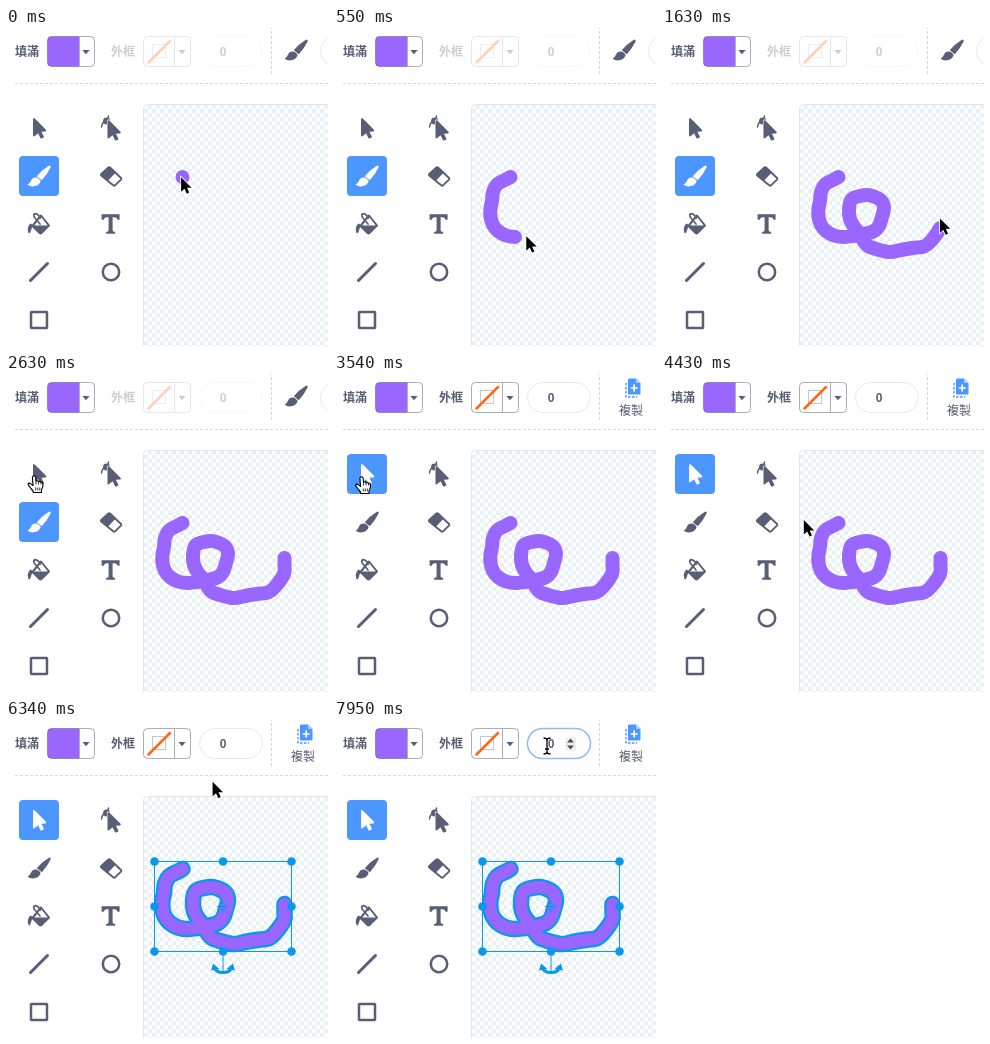
These frames come from a looping animation (322x318 px, 8000 ms). An HTML page:

```html
<!DOCTYPE html>
<html lang="zh-Hant">
<head>
<meta charset="utf-8">
<title>Paint editor</title>
<style>
  html, body { margin: 0; width: 100%; height: 100%; overflow: hidden; background: #fff; }
  svg { display: block; }
  text { font: 700 12px "Noto Sans CJK TC", "Noto Sans CJK", "Noto Sans CJK JP", sans-serif; fill: #575e75; }
  .num { font: 700 12px "Liberation Sans", Arial, sans-serif; text-anchor: middle; }
  .ink { fill: #575e75; }
  .line { fill: none; stroke: #575e75; stroke-width: 2.5; stroke-linejoin: round; stroke-linecap: round; }
  .rule { fill: none; stroke: #d9d9d9; stroke-dasharray: 3 2; }
  .edge { fill: none; stroke: #575e75; stroke-opacity: .5; }
  .pill { fill: #fff; stroke: #e8e8e8; }
  .active .ink { fill: #fff; }
  .draw { fill: none; stroke-linecap: round; stroke-linejoin: round; }
  .blue { fill: none; stroke: #0a99ea; }
  .dot { fill: #0a99ea; }
</style>
</head>
<body>
<svg width="322" height="318" viewBox="0 0 322 318">
  <defs>
    <pattern id="check" x="142" y="77" width="8" height="8" patternUnits="userSpaceOnUse">
      <rect width="8" height="8" fill="#fff"/>
      <path d="M0 0h4v8h4V4H0z" fill="#e8f0f8"/>
    </pattern>
    <path id="brush" d="M11-10.3Q12.2-9.8 11.4-8.2 8-1 2.8 4.2L-2.2.2Q3-6 9.5-10 10.4-10.6 11-10.3ZM-3 1.6Q.8 2.6 1.6 5.4 0 9.5-5 10.3-9 10.8-11.4 8.4-9.2 8-8.2 5-6.6 1.2-3 1.6Z"/>
    <path id="pointer" d="M-6-9.2Q-5.4-10.4-4.2-9.4L7 1.8Q8 3.2 6.4 3.4L2.4 3.7 4.8 8.6Q5 9.4 4.3 9.8L2.6 10.5Q1.8 10.7 1.4 10L-.9 5.2-4.2 8.1Q-5.8 9-6 7.4Z"/>
    <path id="caret" class="ink" d="M-3.6-2H3.6L0 2.2Z"/>
    <path id="ibeam" d="M-3.5-8Q0-8 0-6V6Q0 8-3.5 8M3.5-8Q0-8 0-6M3.5 8Q0 8 0 6M-2 3H2"/>
  </defs>

  <!-- top bar -->
  <text x="9" y="28">填滿</text>
  <path d="M73 8.5H45.5a4 4 0 0 0-4 4v22a4 4 0 0 0 4 4H73Z" fill="#96f"/>
  <path class="edge" d="M73.5 9V38"/>
  <rect class="edge" x="41.5" y="8.5" width="47" height="30" rx="4"/>
  <use href="#caret" x="80" y="24"/>
  <g id="outline">
    <text x="105" y="28">外框</text>
    <rect x="146.5" y="16.5" width="13" height="13" fill="none" stroke="#c4c6cc"/>
    <path d="M142.5 34.5 164 13" stroke="#ff661a" stroke-width="2.5" stroke-linecap="round"/>
    <path class="edge" d="M168.5 9V38"/>
    <rect class="edge" x="137.5" y="8.5" width="47" height="30" rx="4"/>
    <use href="#caret" x="176" y="24"/>
    <rect id="field" class="pill" x="193.5" y="8.5" width="63" height="30" rx="15"/>
    <text class="num" x="217" y="28">0</text>
  </g>
  <g id="spin">
    <rect x="231" y="17" width="11" height="14" rx="2" fill="#efefef"/>
    <path d="M233 22.5h7L236.5 18.5ZM233 25.5h7L236.5 29.5Z" fill="#4d4d4d"/>
  </g>
  <path class="rule" d="M265.5-2V46M9 55.5H322"/>
  <g id="brushBar">
    <use class="ink" href="#brush" x="290" y="22"/>
    <rect class="pill" x="314.5" y="8.5" width="63" height="30" rx="15"/>
  </g>
  <g id="copyBar">
    <path d="M292 9V23H303" fill="none" stroke="#4c97ff" stroke-width="1.4" stroke-dasharray="2.5 1.5"/>
    <path d="M295 4.5H302L306.5 9V19.5a1 1 0 0 1-1 1H295a1 1 0 0 1-1-1V5.5a1 1 0 0 1 1-1Z" fill="#4c97ff"/>
    <path d="M302 4.5V9H306.5Z" fill="#a6cbff"/>
    <path d="M300.2 10.5v7M296.7 14h7" stroke="#fff" stroke-width="1.7"/>
    <text x="285" y="41" style="font-weight:400">複製</text>
  </g>

  <!-- tools -->
  <rect id="mark" x="13" width="40" height="40" rx="4" fill="#4c97ff"/>
  <g id="selectTool"><use class="ink" href="#pointer" x="33" y="100"/></g>
  <g id="brushTool"><use class="ink" href="#brush" x="33" y="148"/></g>
  <g transform="translate(105 100)">
    <path class="line" d="M-9.5-1Q-9-6-4.5-7.5-2.5-8.5-2.5-12" style="stroke-width:1.5"/>
    <circle class="ink" cx="-4.5" cy="-7" r="3.4"/>
    <use class="ink" href="#pointer" x="2.5" y="2" stroke="#fff" stroke-width="1.2" paint-order="stroke"/>
  </g>
  <g transform="translate(105 148)">
    <path class="line" d="M-9.8-2-2.6-8.6Q-1.8-9.2-1-8.5L10 2Q10.7 2.8 10 3.6L4 9.4Q3 10 2.2 9.3L-9.8-.5Q-10.5-1.2-9.8-2Z" style="stroke-width:1.9"/>
    <path class="ink" d="M-9.8-2-2.6-8.6Q-1.8-9.2-1-8.5L4.5-3.2-3.2 4.8-9.8-.5Q-10.5-1.2-9.8-2Z"/>
  </g>
  <g transform="translate(33 196)">
    <path class="line" d="M2-8.5 10 1.5 2.5 9Q1.5 9.8.5 9L-6.5 2Z" style="stroke-width:2"/>
    <path class="ink" d="M-6.5 1.5 10 1.5 2.5 9Q1.5 9.8.5 9ZM-8-.5C-11.5 1-12 7-10 9.5-7.5 8.5-8.5 4-5.5 2Z"/>
    <path class="line" d="M1 0-4.5-6.5Q-6.5-10-3.5-10.3-1-10 1.5-6" style="stroke-width:1.7"/>
  </g>
  <path class="ink" transform="translate(-.4 -.8)" d="M96 187h18v5.5h-2Q111.5 190 109 190h-2v13q0 1.5 2.5 1.7V206.5h-9V204.7q2.5-.2 2.5-1.7V190h-2Q98.500 190 98 192.5H96Z"/>
  <path class="line" d="M24.5 252.5 41.5 235.5" style="stroke-width:3"/>
  <circle class="line" cx="105" cy="244" r="8.2"/>
  <rect class="line" x="25" y="284" width="16" height="16" rx=".5"/>

  <!-- canvas -->
  <rect x="137.5" y="76.5" width="200" height="260" rx="4" fill="url(#check)" stroke="#dfe6ee"/>
  <path id="halo" class="draw" stroke="#0a99ea" stroke-width="16.5"/>
  <path id="stroke" class="draw" stroke="#96f"/>
  <circle id="tip" r="7" fill="#96f"/>
  <g id="frame" class="blue">
    <rect x="148.5" y="141.5" width="137" height="90"/>
    <circle cx="217" cy="186.5" r="3.5"/>
    <path d="M211 186.5h12M217 180.5v12"/>
  </g>
  <g id="handles">
    <path class="blue" d="M217 231V252"/>
    <path class="blue" d="M208.5 247Q209 252.500 217 252.5 225 252.500 225.5 247" stroke-width="3"/>
    <path class="dot" d="M205 250.500 207 243.5 213.500 249ZM229 250.500 227 243.5 220.500 249Z"/>
  </g>

  <!-- cursors -->
  <g id="cursor">
    <path id="arrow" d="M.6.8V15.3L4 12.2 6.3 17.2 8.7 16.1 6.5 11.2H11Z" stroke="#fff" stroke-width="1.6" paint-order="stroke"/>
    <g id="hand" fill="#fff" stroke="#000" stroke-width="1.1" stroke-linejoin="round">
      <path d="M-1.6 1.4Q0-.8 1.6 1.4L2 5.8Q3.7 4.6 4.6 6.2 6.2 5.2 7 6.8 8.9 6.4 9 8.5 9.1 12 7.5 14.3V17H-.5Q-1 15-3 13-5.6 10-6 8.5-5 6.8-3 8.4L-1 10Z"/>
      <path d="M2 5.8V9M4.6 6.2V9M7 6.8V9M1.8 12v3M3.8 12v3M5.8 12v3" stroke-width=".8"/>
    </g>
    <g id="beam" fill="none">
      <use href="#ibeam" stroke="#fff" stroke-width="2.6"/>
      <use href="#ibeam" stroke="#000" stroke-width="1.3"/>
    </g>
  </g>
</svg>
<script>
const LOOP = 8000, STEP = 88;
const $ = id => document.getElementById(id);
const show = (id, on) => { $(id).style.display = on ? '' : 'none'; };
const mix = (a, b, k) => a + (b - a) * k;

// Centre line of the stroke; the brush covers two points on every step.
const pts = [
  [176.5, 149], [170, 152.5], [163, 156.5], [159, 164], [158, 173], [156.5, 181],
  [156.5, 189], [159, 197], [164, 203], [172, 207.5], [181, 209], [190, 208],
  [199, 206.5], [206, 205], [212, 203], [217, 198], [220, 189], [222, 180],
  [219.5, 173], [212, 168.5], [204, 167], [190, 171], [187, 182], [188, 191],
  [191.5, 198], [197, 205], [201, 212], [206, 218], [216, 221.5], [228, 224],
  [239, 222], [251, 220], [262, 218.5], [269, 213], [278, 200], [278.5, 192], [278.5, 184]
];
const STEPS = (pts.length - 1) / 2;

// Smooth curve through the points, one Bezier piece per point.
const at = i => pts[Math.max(0, Math.min(pts.length - 1, i))];
const pieces = pts.map((p, i) => {
  if (!i) return `M${p}l0 .01M${p}`;
  const a = at(i - 2), b = at(i - 1), d = at(i + 1);
  const c1 = [0, 1].map(k => b[k] + (p[k] - a[k]) / 6);
  const c2 = [0, 1].map(k => p[k] - (d[k] - b[k]) / 6);
  return `C${c1} ${c2} ${p}`;
});
$('halo').setAttribute('d', pieces.join(''));

function stepsDrawn(t) {
  if (t < 190) return 0;
  if (t >= 1990) return STEPS;
  return Math.min(STEPS - 1, Math.floor((t - 100) / 90));
}

// Cursor poses: [time, x, y, shape], each held until the next.
const poses = [[0, 174.5, 148.5, 'arrow']];
for (let i = 0; i < STEPS; i++) {
  const a = pts[2 * i], b = pts[2 * i + 2];
  poses.push([100 + i * 90, mix(a[0], b[0], .65) - 1, mix(a[1], b[1], .65), 'arrow']);
}
const smooth = k => k * k * (3 - 2 * k);
function glide(start, n, from, to) {
  for (let i = 1; i <= n; i++) {
    const k = smooth(i / n), x = mix(from[0], to[0], k), y = mix(from[1], to[1], k);
    const onTool = y > 80 && (x < 53 || (x > 85 && x < 125 && y < 120));
    poses.push([start + (i - 1) * STEP, x, y, onTool ? 'hand' : 'arrow']);
  }
}
glide(2190, 6, [277, 185], [28, 101.5]);
poses.push([2980, 28, 102, 'hand'], [3540, 27.5, 102.5, 'hand'], [3630, 27.5, 103.5, 'hand']);
glide(3990, 10, [27.5, 103.5], [203, 168]);
glide(5900, 6, [203, 168], [206, 61]);
poses.push(
  [6430, 207, 51, 'arrow'], [6520, 208, 45, 'arrow'], [6610, 209, 41, 'arrow'],
  [6700, 210, 35, 'beam'], [6790, 212, 31, 'beam'], [6870, 213, 28, 'beam'], [7050, 213, 26, 'beam']
);

// Eight resize handles around the frame.
for (let i = 0; i < 9; i++) {
  if (i === 4) continue;
  const c = document.createElementNS('http://www.w3.org/2000/svg', 'circle');
  c.setAttribute('class', 'dot');
  c.setAttribute('r', 4.3);
  c.setAttribute('cx', 148.5 + (i % 3) * 68.5);
  c.setAttribute('cy', 141.5 + Math.floor(i / 3) * 45);
  $('handles').append(c);
}

function render(t) {
  const [, x, y, shape] = poses.filter(p => p[0] <= t).pop();
  const picking = t >= 2980, lit = t >= 4600, focus = t >= 7950;

  $('outline').style.opacity = picking ? 1 : .3;
  show('brushBar', !picking);
  show('copyBar', picking);
  $('mark').setAttribute('y', picking ? 80 : 128);
  $('selectTool').setAttribute('class', picking ? 'active' : '');
  $('brushTool').setAttribute('class', picking ? '' : 'active');

  $('stroke').setAttribute('d', pieces.slice(0, 2 * stepsDrawn(t) + 1).join(''));
  $('stroke').setAttribute('stroke-width', lit ? 12 : 14);
  show('halo', lit);
  show('tip', t >= 2190 && !picking && x > 138);
  $('tip').setAttribute('cx', x + 1);
  $('tip').setAttribute('cy', y + 1);
  show('frame', t >= 5130);
  show('handles', t >= 5400);

  show('spin', t >= 6700);
  $('field').style.stroke = focus ? '#8fbafa' : '';
  $('field').style.strokeWidth = focus ? 1.5 : '';

  for (const id of ['arrow', 'hand', 'beam']) show(id, id === shape);
  $('cursor').setAttribute('transform', `translate(${x} ${y})`);
}

const begin = performance.now();
function tick() {
  render((performance.now() - begin) % LOOP);
  requestAnimationFrame(tick);
}
tick();
</script>
</body>
</html>
```
